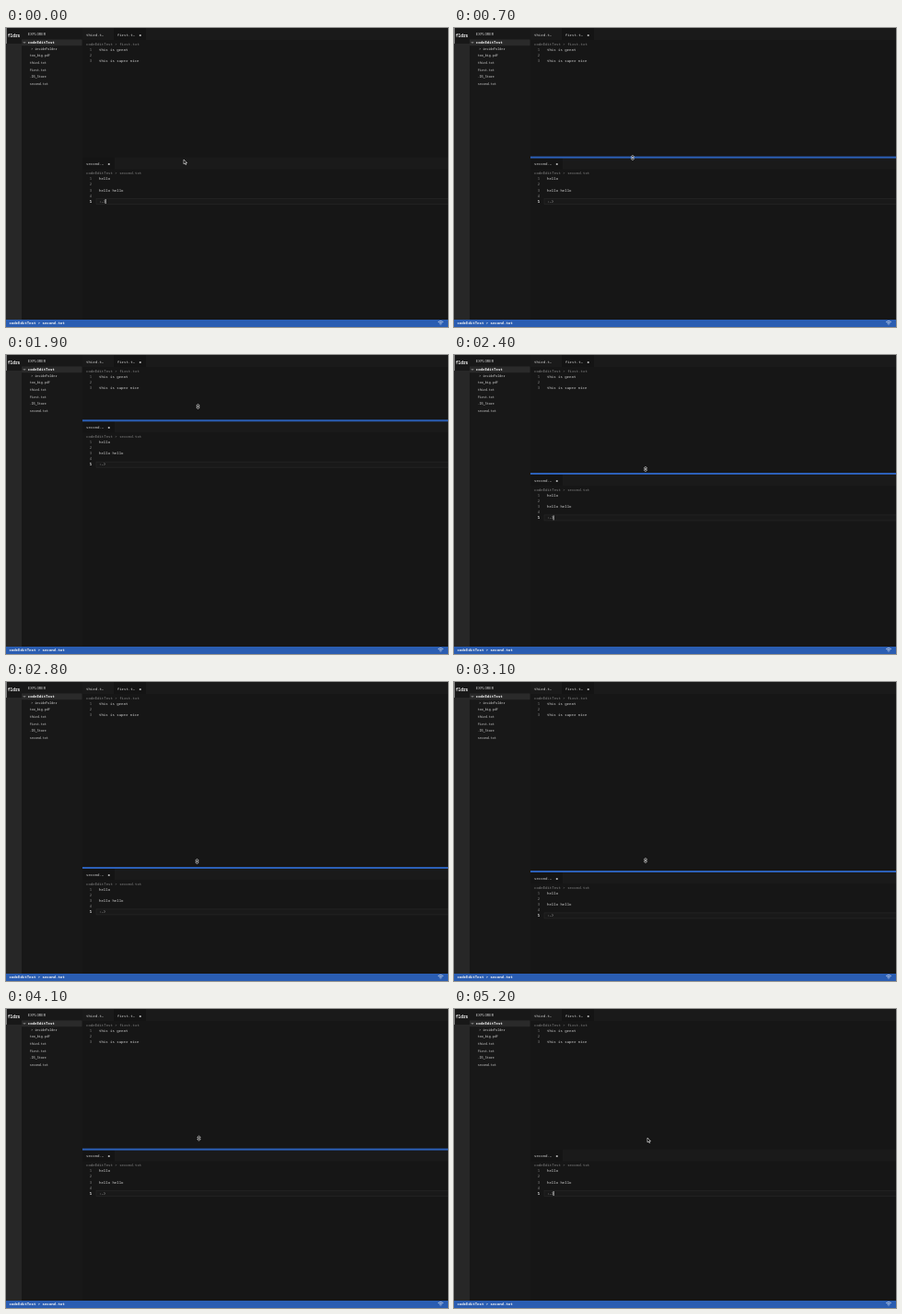
Write an HTML page that moves like this. It is 480 px wide and 325 px high and loops after 5500 ms.

```html
<!DOCTYPE html>
<html lang="en">
<head>
<meta charset="utf-8">
<title>Split editor resize</title>
<style>
html, body { margin: 0; width: 100%; height: 100%; overflow: hidden; background: #161616; }
svg { display: block; width: 100%; height: 100%; }
text { font: 4.03px "Noto Sans Mono", "DejaVu Sans Mono", monospace; fill: #d2d2d2; white-space: pre; }
.file { font-size: 3.35px; }
.brand { font-size: 4.5px; font-weight: 700; fill: #f2f2f2; }
.bright { fill: #f4f4f4; font-weight: 600; }
.dim { fill: #858585; }
.cursor { fill: #080808; stroke: #eee; stroke-width: .6; stroke-linejoin: round; }
</style>
</head>
<body>
<svg viewBox="0 0 480 325" preserveAspectRatio="none">
  <rect width="480" height="325" fill="#161616"/>
  <g id="top"></g>
  <g id="bottom"></g>
  <rect id="divider" x="83" width="397" y="-1" height="2" fill="#2c60b8"/>
  <g id="sidebar">
    <rect width="83" height="317" fill="#181818"/>
    <rect width="17" height="317" fill="#272727"/>
    <rect width="17" height="17" fill="#181818"/>
    <rect width=".7" height="17" fill="#aaa"/>
    <rect x="17" y="12.4" width="65.5" height="6.8" fill="#2a2a2a"/>
    <path d="M18.8 15l1.2 1.4 1.2-1.4" fill="none" stroke="#ccc" stroke-width=".6"/>
  </g>
  <g id="status">
    <rect y="317" width="480" height="8" fill="#2a5db2"/>
    <path d="M469.2 319.6q2.8-2.3 5.6 0M470.4 320.9q1.6-1.3 3.2 0" fill="none" stroke="#e6ecf6" stroke-width=".7"/>
    <circle cx="472" cy="322" r=".6" fill="#e6ecf6"/>
  </g>
  <path id="arrow" class="cursor" d="M0 0V4.9L1.2 3.9 2 5.6 2.9 5.2 2.1 3.5H3.6Z"/>
  <path id="resize" class="cursor" d="M0-2.8L1.7-.9H.5V.9H1.7L0 2.8-1.7.9H-.5V-.9H-1.7Z"/>
</svg>
<script>
const $ = id => document.getElementById(id);

function add(parent, tag, attributes, content = "") {
  const node = document.createElementNS(parent.namespaceURI, tag);
  for (const name in attributes) node.setAttribute(name, attributes[name]);
  node.textContent = content;
  parent.append(node);
  return node;
}

// y is the optical middle of the line
function label(parent, x, y, content, style = "") {
  return add(parent, "text", { x, y: y + 1.3, class: style }, content);
}

function buildPane(pane, tabs, file, lines) {
  const activeX = 83 + (tabs.length - 1) * 34;
  add(pane, "rect", { x: 83, width: 397, height: 325, fill: "#161616" });
  add(pane, "rect", { x: 83, width: 397, height: 13, fill: "#1a1a1a" });
  add(pane, "rect", { x: activeX, width: 35, height: 13, fill: "#141414" });
  tabs.forEach((tab, i) => label(pane, 87 + i * 33.8, 7.2, tab));
  label(pane, activeX + 27.6, 7.2, "x", "bright");
  label(pane, 87, 17.3, `codeEditTest > ${file}`, "dim");
  lines.forEach((line, i) => {
    const y = 23.5 + i * 6.1;
    const active = i === 4;
    if (active) add(pane, "rect", {
      x: 98, y: y - 3, width: 383, height: 6,
      fill: "#191919", stroke: "#282828", "stroke-width": .6
    });
    label(pane, 90.8, y, i + 1, active ? "bright" : "dim");
    label(pane, 101, y, line);
  });
}

buildPane($("top"), ["third.t…", "first.t…"], "first.txt",
  ["this is great", "", "this is super nice"]);
buildPane($("bottom"), ["second.…"], "second.txt",
  ["hello", "", "hello hello", "", ":-)"]);
const caret = add($("bottom"), "rect", { x: 107.7, y: 45.4, width: .8, height: 5, fill: "#eee" });

label($("sidebar"), 1.8, 8.7, "fldrs", "brand");
label($("sidebar"), 23.8, 6.3, "EXPLORER");
label($("sidebar"), 23.8, 15.7, "codeEditTest", "bright");
label($("sidebar"), 27.3, 22.8, "> insideFolder", "file");
["too_big.pdf", "third.txt", "first.txt", ".DS_Store", "second.txt"]
  .forEach((name, i) => label($("sidebar"), 25.8, 29.9 + i * 7.7, name, "file"));
label($("status"), 3.4, 320.8, "codeEditTest > second.txt", "bright");

// [tick, pointer x, pointer y, divider y]; one tick is 100 ms
const path = [
  [0, 193, 143, 140.6], [3, 194, 141, 140.6], [9, 194, 141, 140.6],
  [10, 194, 136, 149], [11, 194, 131, 145], [13, 195, 113.5, 129.2],
  [15, 198, 98, 113], [17, 205, 69, 84], [18, 207, 60, 75],
  [19, 208.5, 56, 71.3], [20, 208.5, 60, 72.5], [21, 208.5, 71, 80],
  [22, 208, 86, 92], [24, 208, 124, 129], [26, 207.5, 163, 169],
  [28, 207.5, 195, 202], [29, 207.5, 201, 210], [30, 207.5, 200, 211],
  [31, 208, 194, 206], [33, 208, 176, 189.5], [35, 208.5, 159, 171.8],
  [37, 209, 147, 159.5], [39, 209.5, 142, 154.4], [41, 209.5, 140.5, 152.6],
  [43, 210, 140, 152.6], [55, 210, 140, 152.6]
];

function sample(tick) {
  const next = path.findIndex(key => key[0] > tick);
  const a = path[next - 1], b = path[next];
  const part = (tick - a[0]) / (b[0] - a[0]);
  return a.map((value, i) => value + (b[i] - value) * part);
}

function draw(now) {
  const tick = Math.floor(now % 5500 / 100);
  const [, x, y, split] = sample(tick);
  const resizing = tick >= 3 && tick < 43;
  const show = (node, visible) => node.setAttribute("visibility", visible ? "visible" : "hidden");
  const move = (id, dx, dy) => $(id).setAttribute("transform", `translate(${dx} ${dy})`);
  move("bottom", 0, split);
  move("divider", 0, split);
  move("arrow", x, y);
  move("resize", x, y);
  show($("divider"), resizing);
  show($("resize"), resizing);
  show($("arrow"), !resizing);
  show(caret, tick < 2 || (tick + 8) % 10 < 5);
}

const start = performance.now();
function loop() {
  draw(performance.now() - start);
  requestAnimationFrame(loop);
}
loop();
</script>
</body>
</html>
```
